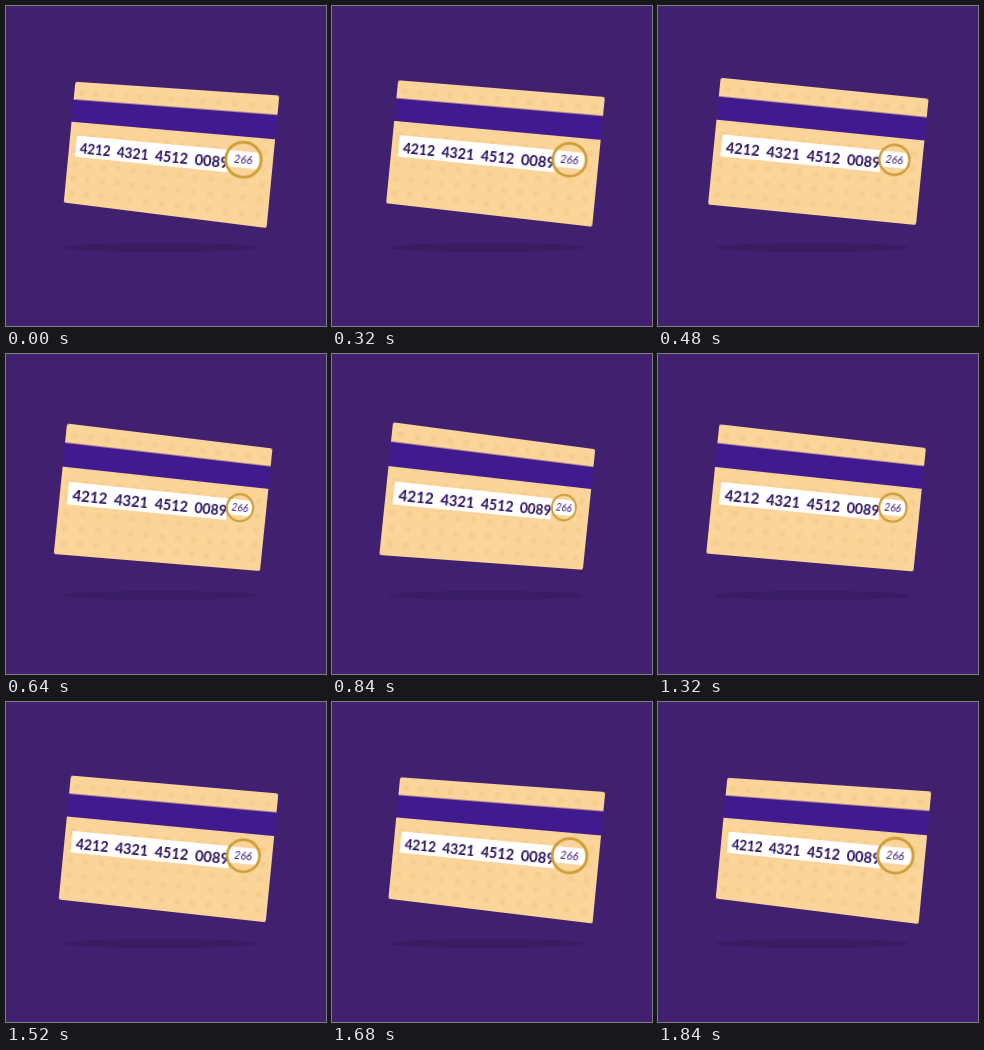
An HTML page that plays this animation: 320 by 320 pixels, repeating every 1.88 s.

```html
<!DOCTYPE html>
<html lang="en">
<head>
<meta charset="utf-8">
<title>Card</title>
<style>
html, body { margin: 0; width: 100%; height: 100%; overflow: hidden; background: #41206f; }
#stage { position: relative; width: 320px; height: 320px; overflow: hidden; }
#shadow { position: absolute; left: 57px; top: 237px; width: 194px; height: 9px; border-radius: 50%; background: #391c64; }
#card { position: absolute; left: 56px; top: 82px; width: 209px; height: 127.2px; }
text { font-family: Lato, sans-serif; }
#number { font-size: 14.5px; font-weight: 700; fill: #2b1260; }
#code { font-size: 10.7px; font-style: italic; text-anchor: middle; fill: #3b1d78; }
</style>
</head>
<body>
<div id="stage">
  <div id="shadow"></div>
  <svg id="card" viewBox="0 0 209 127.2">
    <defs>
      <pattern id="dots" width="16" height="15" x="0" y="3" patternUnits="userSpaceOnUse">
        <rect x="5" y="5" width="6" height="6" fill="#f6ce8d"/>
      </pattern>
      <clipPath id="lens"><circle class="ring" cx="181" cy="64.2"/></clipPath>
    </defs>
    <rect width="209" height="127.2" rx="2.5" fill="#fad498"/>
    <rect width="209" height="127.2" rx="2.5" fill="url(#dots)"/>
    <rect y="18.6" width="209" height="23.4" fill="#421a90"/>
    <rect x="7.5" y="56" width="160" height="22" fill="#fff"/>
    <g id="number">
      <text x="12.2" y="73.7">4212</text>
      <text x="52.7" y="73.7">4321</text>
      <text x="93.2" y="73.7">4512</text>
      <text x="133.7" y="73.7">0089</text>
    </g>
    <circle class="ring" cx="181" cy="64.2" fill="#fad498"/>
    <rect x="160" y="56.2" width="42" height="16" fill="#fff" clip-path="url(#lens)"/>
    <circle class="ring" cx="181" cy="64.2" fill="none" stroke="#cd9e38"/>
    <text id="code" x="180.8" y="68.2">266</text>
  </svg>
</div>
<script>
const LOOP = 1880, TURN = 960;
const card = document.getElementById('card');
const rings = document.querySelectorAll('.ring');
const ease = s => s * s / (s * s + (1 - s) * (1 - s));

function draw(now) {
  const t = now % LOOP;
  const there = t < TURN ? ease(t / TURN) : 1 - ease((t - TURN) / (LOOP - TURN));
  const swing = 1 - 2 * there; // 1: right side near, -1: left side near
  const yaw = 0.5 - 13.2 * swing;
  const roll = 5.7 - 0.2 * swing;
  card.style.transform = `perspective(493px) rotateZ(${roll}deg) rotateY(${yaw}deg)`;
  const r = 15 + 1.9 * swing;
  for (const ring of rings) {
    ring.setAttribute('r', r);
    ring.setAttribute('stroke-width', r * 0.165);
  }
}

let start;
function tick(now) {
  start ??= now;
  draw(now - start);
  requestAnimationFrame(tick);
}
draw(0);
requestAnimationFrame(tick);
</script>
</body>
</html>
```
